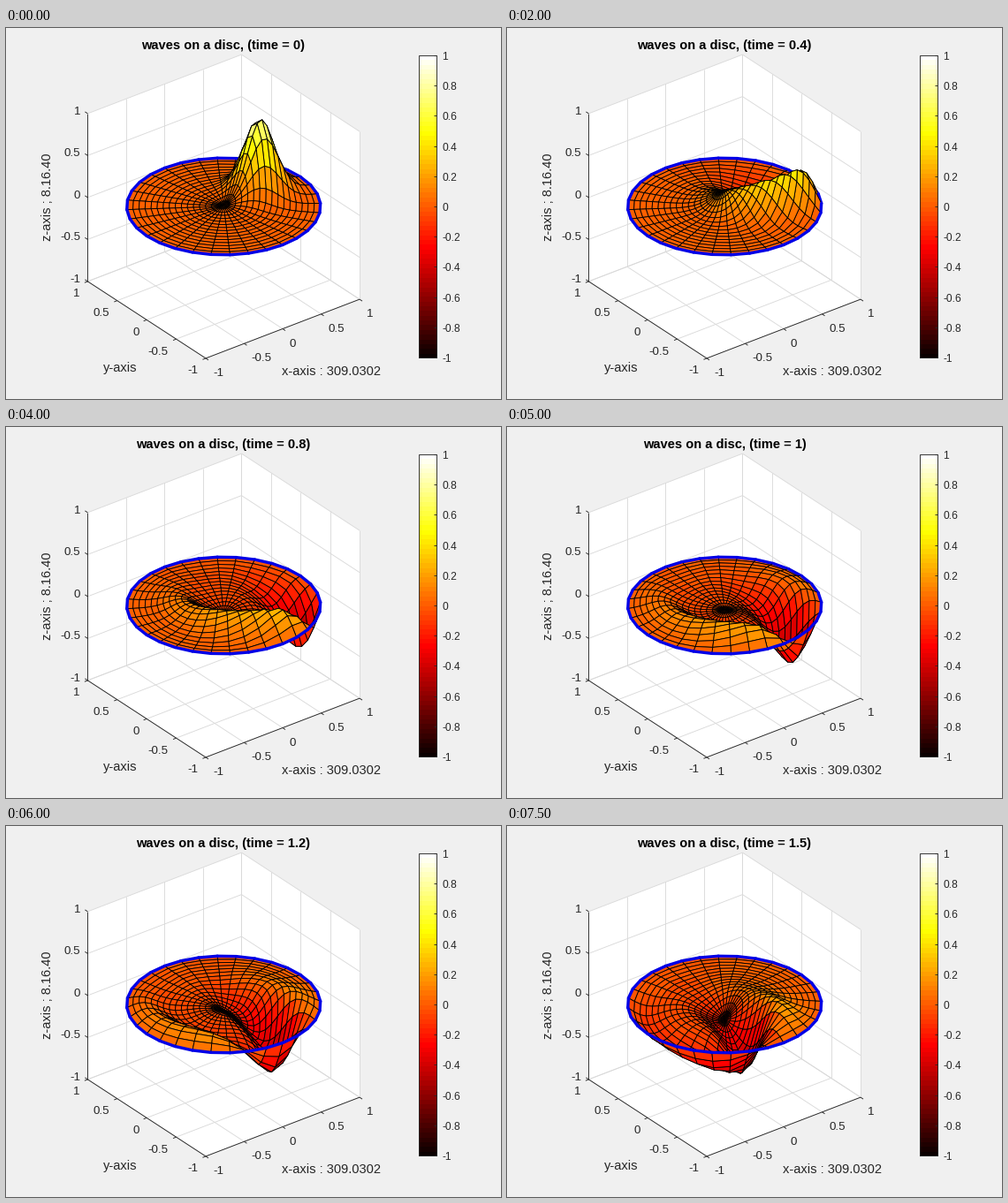
A matplotlib script that plays this animation: 560x420 px, repeating every 8 s.

```python
import numpy as np
import matplotlib.pyplot as plt
from matplotlib.animation import FuncAnimation
from matplotlib.collections import LineCollection, PolyCollection
from matplotlib.patches import Polygon, Rectangle

W, H, DPI = 560, 420, 100
PX = 72 / DPI                      # points per pixel
FRAMES, DT = 16, 0.1
RINGS, SPOKES = 16, 32
INK = "#262626"

plt.rcParams["font.family"] = "Liberation Sans"

# --- orthographic view, azimuth -37.5, elevation 30 ---
AZ, EL = np.radians([-37.5, 30])
SCALE, CX, CY = 109.7, 246.2, 202


def project(x, y, z):
    px = CX + SCALE * (np.cos(AZ) * x + np.sin(AZ) * y)
    up = np.sin(EL) * (np.cos(AZ) * y - np.sin(AZ) * x) + np.cos(EL) * z
    return np.stack(np.broadcast_arrays(px, CY - SCALE * up), axis=-1)


def depth(x, y, z):
    return np.cos(EL) * (np.sin(AZ) * x - np.cos(AZ) * y) + np.sin(EL) * z


def hot(z):
    i = np.clip(np.floor((np.asarray(z) + 1) * 32 + 1e-3), 0, 63) + 1
    rgb = [i / 24, (i - 24) / 24, (i - 48) / 16, np.ones_like(i)]
    return np.clip(np.stack(rgb, axis=-1), 0, 1)


# --- wave equation on the unit disc, fixed rim, solved mode by mode ---
def solve(times, n=80):
    h = 1 / (n + 0.5)
    r = (np.arange(n) + 0.5) * h
    th = np.arange(SPOKES) * 2 * np.pi / SPOKES
    dx = r[:, None] * np.cos(th) - 0.48
    dy = r[:, None] * np.sin(th) - 0.02
    sharp, push = 18, 1.1
    u0 = 0.87 * np.exp(-sharp * (dx**2 + dy**2))
    v0 = -push * 2 * sharp * dy * u0       # bump sets off towards -y

    root = np.sqrt(r)[:, None]
    a, b = np.fft.rfft(u0 * root, axis=1), np.fft.rfft(v0 * root, axis=1)
    off = -np.arange(1, n) * h / (h * h * np.sqrt(r[:-1] * r[1:]))
    spec = np.zeros((len(times),) + a.shape, complex)
    for m in range(a.shape[1]):
        op = np.diag(2 / h**2 + m**2 / r**2) + np.diag(off, 1) + np.diag(off, -1)
        lam, vec = np.linalg.eigh(op)
        w = np.sqrt(lam)
        am, bm = vec.T @ a[:, m], vec.T @ b[:, m]
        for k, t in enumerate(times):
            spec[k, :, m] = vec @ (am * np.cos(w * t) + bm * np.sin(w * t) / w)
    u = np.fft.irfft(spec, SPOKES, axis=2) / root

    rho, nodes = np.linspace(0, 1, RINGS + 1), np.append(r, 1)
    out = np.zeros((len(times), RINGS + 1, SPOKES + 1))
    for k in range(len(times)):
        for j in range(SPOKES):
            out[k, :, j] = np.interp(rho, nodes, np.append(u[k, :, j], 0))
        out[k, 0] = u[k, 0].mean()
    out[:, :, -1] = out[:, :, 0]
    return out


waves = solve(np.arange(FRAMES) * DT)
rad, ang = np.meshgrid(np.linspace(0, 1, RINGS + 1),
                       np.linspace(0, 2 * np.pi, SPOKES + 1), indexing="ij")
X, Y = rad * np.cos(ang), rad * np.sin(ang)

# --- stage ---
fig = plt.figure(figsize=(W / DPI, H / DPI), dpi=DPI, facecolor="#f0f0f0")
ax = fig.add_axes([0, 0, 1, 1])
ax.axis("off")


def label(x, y, s, size, ha="center", **kw):
    return ax.text(x, y, s, fontsize=size * PX, ha=ha, va="baseline",
                   color=kw.pop("color", INK), **kw)


def lines(segs, color, width, z):
    ax.add_collection(LineCollection(segs, colors=color, linewidths=width * PX,
                                     zorder=z))


def seg(p, q):
    return [project(*p), project(*q)]


def quad(*pts):
    ax.add_patch(Polygon([project(*p) for p in pts], fc="white", ec="none", zorder=0))


quad((-1, -1, -1), (1, -1, -1), (1, 1, -1), (-1, 1, -1))
quad((-1, 1, -1), (1, 1, -1), (1, 1, 1), (-1, 1, 1))
quad((1, -1, -1), (1, 1, -1), (1, 1, 1), (1, -1, 1))

ticks = np.linspace(-1, 1, 5)
grid = []
for t in ticks:
    grid += [seg((t, -1, -1), (t, 1, -1)), seg((-1, t, -1), (1, t, -1)),
             seg((t, 1, -1), (t, 1, 1)), seg((1, t, -1), (1, t, 1)),
             seg((-1, 1, t), (1, 1, t)), seg((1, -1, t), (1, 1, t))]
lines(grid, "#dadada", 0.9, 1)

frame = [seg((-1, -1, -1), (1, -1, -1)), seg((-1, -1, -1), (-1, 1, -1)),
         seg((-1, 1, -1), (-1, 1, 1))]
for t in ticks:
    px, py, pz = project(t, -1, -1), project(-1, t, -1), project(-1, 1, t)
    frame += [[px, px + (3, 2)], [py, py + (-3.5, 1.4)], [pz, pz + (-3, -2)]]
    s = f"{t:g}"
    label(px[0] + 8, px[1] + 20, s, 13.33, "left")
    label(py[0] - 8.7, py[1] + 17.5, s, 13.33, "right")
    label(84, pz[1] + 1, s, 13.33, "right")
lines(frame, INK, 0.9, 2)

label(368, 393.3, "x-axis : 309.0302", 14.67)
label(129, 389, "y-axis", 14.67)
label(51, 191.7, "z-axis ; 8.16.40", 14.67, rotation=90, rotation_mode="anchor")
title = label(246, 24, "", 14.67, weight="bold", color="black")

# --- colour bar ---
L, R, TOP, BOT = 467, 487, 31, 373
bands = hot((np.arange(64) + 0.5) / 32 - 1)
ax.imshow(bands[:, None, :], extent=(L, R + 1, BOT + 1, TOP), origin="lower",
          aspect="auto", interpolation="nearest", zorder=1)
ax.set_xlim(0, W)
ax.set_ylim(H, 0)
ax.add_patch(Rectangle((L, TOP), R - L, BOT - TOP, fill=False, ec=INK,
                       lw=0.9 * PX, zorder=2))
marks = []
for i in range(11):
    y = BOT - (BOT - TOP) * i / 10
    marks.append([(R - 3.5, y), (R, y)])
    label(493, y + 5, f"{(i - 5) / 5:g}", 12, "left")
lines(marks, INK, 0.9, 3)

# --- surface and rim, painted back to front ---
surface = PolyCollection([], zorder=5, joinstyle="round", capstyle="round")
ax.add_collection(surface)


def corners(a):
    return np.stack([a[:-1, :-1], a[1:, :-1], a[1:, 1:], a[:-1, 1:]],
                    axis=2 if a.ndim == 2 else 2).reshape((-1, 4) + a.shape[2:])


rim = project(X[-1], Y[-1], 0)
rim_far = depth(X[-1], Y[-1], 0)
rim_depth = (rim_far[:-1] + rim_far[1:]) / 2 + 0.06
rim_segs = [rim[j:j + 2] for j in range(SPOKES)]
n_faces = RINGS * SPOKES
edges = np.array([[0, 0, 0, 1]] * n_faces + [[0, 0, 0.9, 1]] * SPOKES)
widths = np.array([0.9] * n_faces + [3.4] * SPOKES) * PX


def draw(k):
    Z = waves[k]
    polys = list(corners(project(X, Y, Z))) + rim_segs
    order = np.argsort(np.append(corners(depth(X, Y, Z)).mean(axis=1), rim_depth))
    fills = np.vstack([hot(Z[:-1, :-1].ravel()), np.zeros((SPOKES, 4))])
    surface.set_verts([polys[i] for i in order])
    surface.set_facecolor(fills[order])
    surface.set_edgecolor(edges[order])
    surface.set_linewidth(widths[order])
    title.set_text(f"waves on a disc, (time = {k * DT:.2g})")
    return surface, title


anim = FuncAnimation(fig, draw, frames=FRAMES, interval=500, repeat=True,
                     repeat_delay=0, blit=False)
plt.show()
```
